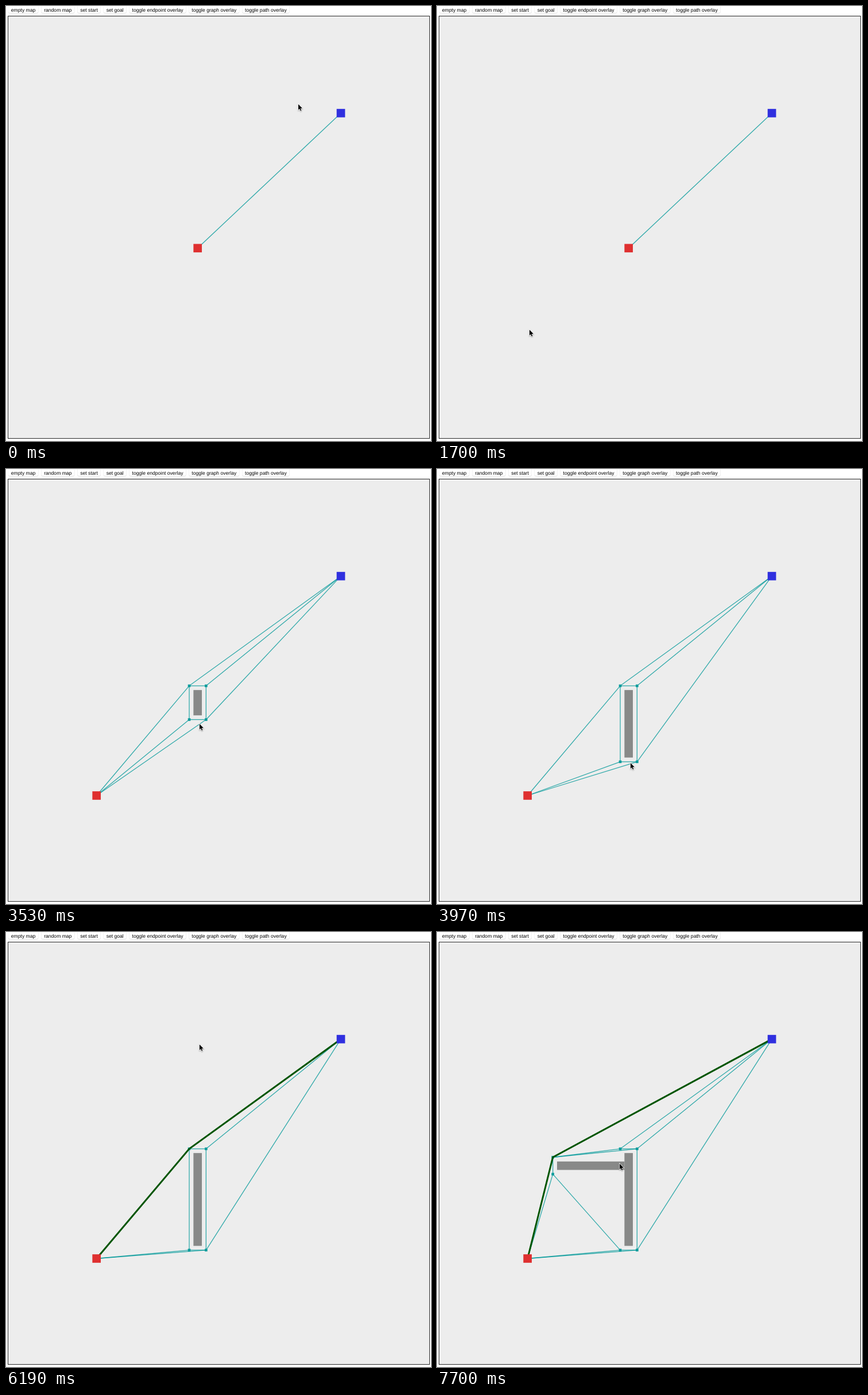
Write an HTML page with a canvas that moves like this. It is 740x756 px and loops after 8000 ms.

```html
<!DOCTYPE html>
<html lang="en">
<head>
<meta charset="utf-8">
<title>Visibility graph</title>
<style>
  html, body { margin: 0; width: 100%; height: 100%; overflow: hidden; background: #fff; }
  canvas { display: block; width: 740px; height: 756px; }
</style>
</head>
<body>
<canvas id="stage" width="740" height="756"></canvas>
<script>
const ctx = document.getElementById('stage').getContext('2d');
const LOOP = 8000, TICK = 153;
const CELL = 44 / 3, LEFT = 3.7, TOP = 17.5;
const TEAL = '#0b9c9c', EDGE = 'rgba(0,153,153,.8)', GREEN = '#005500';

const LABELS = ['empty map', 'random map', 'set start', 'set goal',
  'toggle endpoint overlay', 'toggle graph overlay', 'toggle path overlay'];

// the pointer's turning points: time, x, y
const STOPS = [
  [0, 509, 170], [470, 400, 362], [950, 147, 8], [1230, 147, 8],
  [1680, 161, 562], [1850, 161, 562], [2300, 375, 393], [2750, 337, 397],
  [3213, 337, 397], [4180, 337, 540], [4600, 337, 540], [5180, 457, 7],
  [5600, 457, 7], [6700, 203, 404], [6885, 203, 404], [7038, 243, 404],
  [7480, 318, 402], [LOOP, 318, 402]
];
const DRAGS = [{ press: 3200, release: 4400 }, { press: 6930, release: LOOP }];
const SET_START = 1850, SHOW_PATH = 5460;
const GOAL = [39, 11];

const px = c => LEFT + (c + 0.5) * CELL;
const py = r => TOP + (r + 0.5) * CELL;

function pointerAt(t) {
  const i = STOPS.findIndex(s => s[0] > t);
  const [t0, x0, y0] = STOPS[i - 1], [t1, x1, y1] = STOPS[i];
  const k = (t - t0) / (t1 - t0);
  return [x0 + (x1 - x0) * k, y0 + (y1 - y0) * k];
}

function cellAt(t) {
  const [x, y] = pointerAt(t);
  return [Math.floor((x - LEFT) / CELL), Math.floor((y - TOP) / CELL)];
}

// a drag fills the bar from its first cell to the pointer, one tick behind
function barsAt(t, now) {
  return DRAGS.filter(d => t >= d.press).map(d => {
    const [c0, r0] = cellAt(d.press);
    const [c1, r1] = cellAt(Math.min(now, d.release) - TICK);
    return { c: c0, r: r0, w: c1 - c0 + 1, h: r1 - r0 + 1 };
  });
}

function cellsOf(bars) {
  const cells = [];
  for (const b of bars)
    for (let i = 0; i < b.w; i++)
      for (let j = 0; j < b.h; j++) cells.push([b.c + i, b.r + j]);
  return cells;
}

// free cells lying diagonally off a convex wall corner
function cornersOf(walls) {
  const solid = new Set(walls.map(String));
  const found = new Map();
  for (const [x, y] of walls)
    for (const dx of [-1, 1])
      for (const dy of [-1, 1]) {
        const cell = [x + dx, y + dy];
        if (![cell, [x + dx, y], [x, y + dy]].some(c => solid.has(String(c))))
          found.set(String(cell), cell);
      }
  return [...found.values()];
}

// segment against a wall cell; touching a corner counts
function hits(a, b, wall) {
  let near = 0, far = 1;
  for (let k = 0; k < 2; k++) {
    const d = b[k] - a[k];
    const lo = wall[k] - 0.500001 - a[k], hi = wall[k] + 0.500001 - a[k];
    if (d === 0) {
      if (lo > 0 || hi < 0) return false;
    } else {
      near = Math.max(near, Math.min(lo / d, hi / d));
      far = Math.min(far, Math.max(lo / d, hi / d));
    }
  }
  return near <= far;
}

function buildGraph(nodes, walls) {
  const edges = [];
  for (let i = 0; i < nodes.length; i++)
    for (let j = i + 1; j < nodes.length; j++)
      if (!walls.some(w => hits(nodes[i], nodes[j], w))) edges.push([i, j]);
  return edges;
}

// node 0 is the start, node 1 the goal
function shortestPath(nodes, edges) {
  const dist = nodes.map((_, i) => i ? Infinity : 0);
  const prev = [];
  const relax = (i, j) => {
    const d = dist[i] + Math.hypot(nodes[i][0] - nodes[j][0], nodes[i][1] - nodes[j][1]);
    if (d < dist[j] - 1e-9) { dist[j] = d; prev[j] = i; }
  };
  for (let n = 0; n < nodes.length; n++)
    for (const [i, j] of edges) { relax(i, j); relax(j, i); }
  const path = [];
  for (let i = 1; i !== undefined; i = prev[i]) path.push(nodes[i]);
  return path;
}

function polyline(points, color, width) {
  ctx.beginPath();
  for (const [c, r] of points) ctx.lineTo(px(c), py(r));
  ctx.strokeStyle = color;
  ctx.lineWidth = width;
  ctx.stroke();
}

function square([c, r], color, size) {
  ctx.fillStyle = color;
  ctx.fillRect(px(c) - size / 2, py(r) - size / 2, size, size);
}

function pill(x, y, w, color) {
  ctx.beginPath();
  ctx.roundRect(x, y, w, 13, 3);
  ctx.fillStyle = color;
  ctx.fill();
}

function drawPage() {
  ctx.fillStyle = '#fff';
  ctx.fillRect(0, 0, 740, 756);
  ctx.font = '8.6px "Liberation Sans", Arial, sans-serif';
  ctx.textRendering = 'geometricPrecision';
  let x = 8.8;
  for (const label of LABELS) {
    const w = ctx.measureText(label).width;
    pill(x - 5.1, -0.3, w + 10.2, '#dcdcdc');
    pill(x - 4.8, -1, w + 9.6, '#fff');
    ctx.fillStyle = '#000';
    ctx.fillText(label, x, 9.7);
    x += w + 14.85;
  }
  ctx.fillStyle = '#ededed';
  ctx.fillRect(3, 17, 735, 735);
  ctx.strokeStyle = '#2a2a2a';
  ctx.lineWidth = 1;
  ctx.strokeRect(3.5, 17.5, 734, 734);
}

function drawPointer([x, y]) {
  ctx.save();
  ctx.translate(x, y + 0.8);
  ctx.beginPath();
  for (const [a, b] of [[0, 0], [0, 9.8], [2.2, 7.7], [3.9, 11.4], [5.4, 10.8], [3.8, 7.1], [6.9, 7]])
    ctx.lineTo(a, b);
  ctx.closePath();
  ctx.shadowColor = 'rgba(0,0,0,.35)';
  ctx.shadowBlur = 2;
  ctx.shadowOffsetY = 1;
  ctx.strokeStyle = '#fff';
  ctx.lineWidth = 1.4;
  ctx.stroke();
  ctx.shadowColor = 'transparent';
  ctx.fillStyle = '#000';
  ctx.fill();
  ctx.restore();
}

function draw(t) {
  // the pointer moves in steps
  const now = Math.floor((t + 40) / TICK) * TICK;
  const start = t < SET_START ? [22, 27] : cellAt(SET_START);
  const bars = barsAt(t, now);
  const walls = cellsOf(bars);
  const corners = cornersOf(walls);
  const nodes = [start, GOAL, ...corners];
  const edges = buildGraph(nodes, walls);

  drawPage();
  ctx.fillStyle = '#888988';
  for (const b of bars)
    ctx.fillRect(LEFT + b.c * CELL, TOP + b.r * CELL, b.w * CELL, b.h * CELL);
  for (const [i, j] of edges) polyline([nodes[i], nodes[j]], EDGE, 1.3);
  for (const n of corners) square(n, TEAL, 4.6);
  if (t >= SHOW_PATH) polyline(shortestPath(nodes, edges), GREEN, 3);
  square(start, '#df3030', CELL);
  square(GOAL, '#3030df', CELL);
  drawPointer(pointerAt(now));
}

function tick() {
  draw(performance.now() % LOOP);
  requestAnimationFrame(tick);
}
tick();
</script>
</body>
</html>
```
